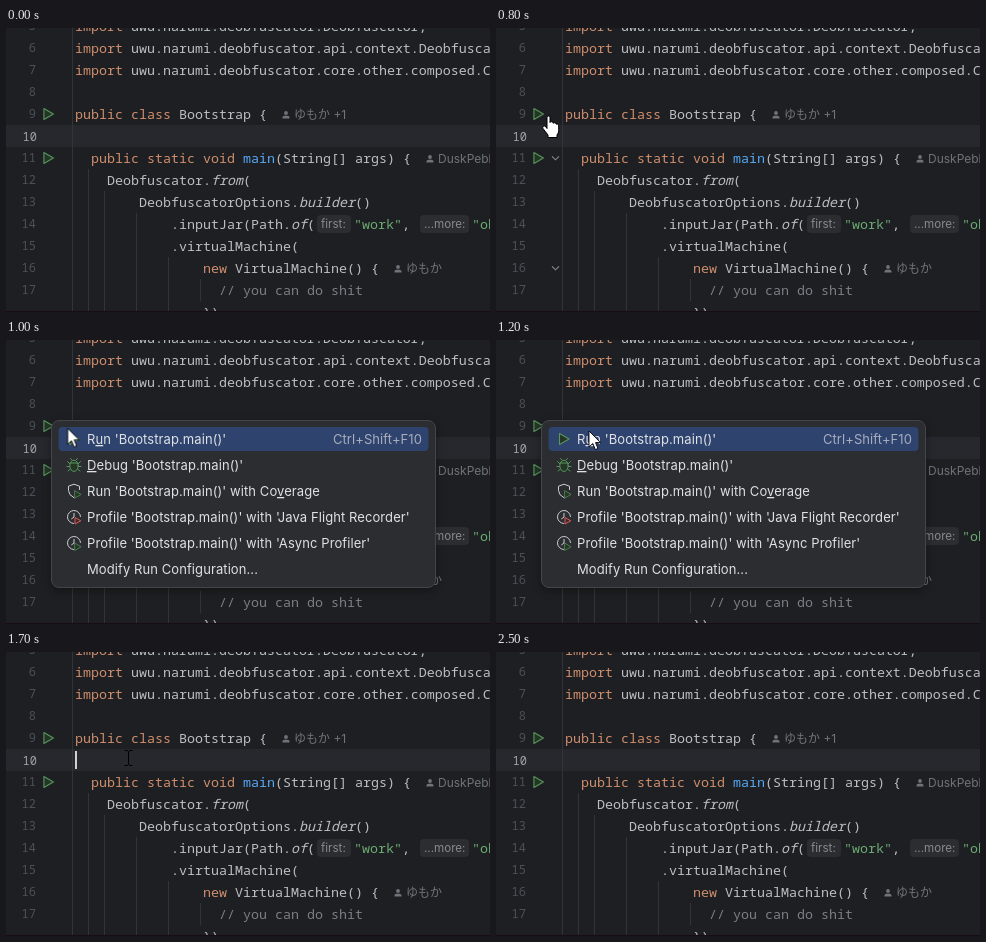
An HTML page for the animation above (2600 ms loop, 484 by 284 pixels).

```html
<!DOCTYPE html>
<html lang="en">
<head>
<meta charset="utf-8">
<title>Run menu in a code editor</title>
<style>
html, body { margin: 0; width: 100%; height: 100%; overflow: hidden; background: #1e1f22; }
svg { display: block; width: 484px; height: 284px; }
text { white-space: pre; }
.code { font: 13.333px "Noto Sans Mono", "DejaVu Sans Mono", monospace; fill: #bcbec4; }
.num { font: 12px "Noto Sans Mono", "DejaVu Sans Mono", monospace; fill: #4b5059; text-anchor: end; }
.num .now { fill: #a1a3ab; }
.kw { fill: #cf8e6d; }
.fn { fill: #56a8f5; }
.str { fill: #6aab73; }
.rem { fill: #7a7e85; }
.it { font-style: italic; }
.hint { font: 12px Inter, "Noto Sans CJK JP", "Noto Sans CJK", sans-serif; fill: #6f737a; }
.tag { font-size: 11.6px; fill: #868a91; }
.ui { font: 13px Inter, "Open Sans", sans-serif; letter-spacing: .085px; fill: #dfe1e5; }
.m { text-decoration: underline; }
.guide { stroke: #313438; fill: none; }
.line { fill: none; stroke: #ced0d6; stroke-linecap: round; stroke-linejoin: round; }

.track, .beam, .hand, .arrow, .caret, .folds, .menu, .pick, .keys {
  animation: 2600ms step-end infinite;
}
.track { animation-name: track; }
.beam { animation-name: beam; }
.hand, .folds { animation-name: hand; }
.arrow, .menu { animation-name: menu; }
.caret { animation-name: caret; }
.pick { animation-name: pick; }
.keys { animation-name: keys; text-anchor: end; }
.menu { filter: drop-shadow(0 3px 4px #0005); }

/* the pointer advances ten times a second */
@keyframes track {
  0% { transform: translate(320px, 210px); }
  3.84% { transform: translate(320px, 210px); animation-timing-function: steps(5); }
  23.07% { transform: translate(78px, 106px); }
  26.92% { transform: translate(56px, 92px); }
  30.76% { transform: translate(53px, 88px); }
  34.61% { transform: translate(46px, 87px); animation-timing-function: steps(3); }
  46.15% { transform: translate(93px, 91px); animation-timing-function: steps(4); }
  61.53% { transform: translate(112px, 97px); }
  65.38% { transform: translate(122px, 106px); animation-timing-function: steps(6); }
  88.46%, 100% { transform: translate(318px, 235px); }
}
@keyframes beam {
  0% { opacity: 0 } 3.84% { opacity: 1 } 26.92% { opacity: 0 }
  65.38% { opacity: 1 } 96.15%, 100% { opacity: 0 }
}
@keyframes hand { 0% { opacity: 0 } 26.92% { opacity: 1 } 34.61%, 100% { opacity: 0 } }
@keyframes menu { 0% { opacity: 0 } 34.61% { opacity: 1 } 65.38%, 100% { opacity: 0 } }
@keyframes pick { 0% { opacity: 0 } 38.46% { opacity: 1 } 65.38%, 100% { opacity: 0 } }
@keyframes keys { 0% { fill: #6f737a } 38.46% { fill: #a8adbd } 65.38%, 100% { fill: #6f737a } }
@keyframes caret {
  0% { opacity: 0 } 3.84% { opacity: 1 } 23.07% { opacity: 0 }
  65.38% { opacity: 1 } 84.61%, 100% { opacity: 0 }
}
</style>
</head>
<body>
<svg viewBox="0 0 484 284">
  <defs>
    <path id="play" d="M-4.5-5.5L5 0L-4.5 5.5Z" fill="#253627" stroke="#57965c" stroke-linejoin="round" stroke-width="1.1"/>
    <g id="user" fill="#6f737a">
      <circle cy="-2" r="1.9"/>
      <path d="M-3.5 3.5V2.6Q-3.5.8-1.6.8H1.6Q3.5.8 3.5 2.6V3.5Z"/>
    </g>
    <path id="fold" d="M-3.5-1.7L0 1.8L3.5-1.7" fill="none" stroke="#868a91" stroke-width="1.1"/>
    <path id="clock" class="line" d="M6.5-.5A6.5 6.5 0 1 0-.5 6.5M0-3.6V0L-2.4 1.8"/>
  </defs>

  <rect width="484" height="284" fill="#1e1f22"/>
  <rect y="97" width="484" height="22" fill="#26282e"/>
  <path class="guide" d="M66.5 0V284M82.5 141V284M98.5 163V284M130.5 185V284M162.5 229V284M194.5 251V273"/>

  <g class="num">
    <text x="30" y="2">5</text>
    <text x="30" y="24">6</text>
    <text x="30" y="46">7</text>
    <text x="30" y="68">8</text>
    <text x="30" y="90">9</text>
    <text x="31" y="112.5" class="now">10</text>
    <text x="30" y="134">11</text>
    <text x="30" y="156">12</text>
    <text x="30" y="178">13</text>
    <text x="30" y="200">14</text>
    <text x="30" y="222">15</text>
    <text x="30" y="244">16</text>
    <text x="30" y="266">17</text>
  </g>

  <g class="code">
    <text x="69" y="3"><tspan class="kw">import</tspan> uwu.narumi.deobfuscator.Deobfuscator;</text>
    <text x="69" y="25"><tspan class="kw">import</tspan> uwu.narumi.deobfuscator.api.context.Deobfuscator</text>
    <text x="69" y="47"><tspan class="kw">import</tspan> uwu.narumi.deobfuscator.core.other.composed.C</text>
    <text x="69" y="91"><tspan class="kw">public class</tspan> Bootstrap {</text>
    <text x="85" y="135"><tspan class="kw">public static void</tspan> <tspan class="fn">main</tspan>(String[] args) {</text>
    <text x="101" y="157">Deobfuscator.<tspan class="it">from</tspan>(</text>
    <text x="133" y="179">DeobfuscatorOptions.<tspan class="it">builder</tspan>()</text>
    <text x="165" y="201">.inputJar(Path.<tspan class="it">of</tspan>(</text>
    <text x="348" y="201"><tspan class="str">"work"</tspan>,</text>
    <text x="466" y="201" class="str">"obf</text>
    <text x="165" y="223">.virtualMachine(</text>
    <text x="197" y="245"><tspan class="kw">new</tspan> VirtualMachine() {</text>
    <text x="213" y="267" class="rem">// you can do shit</text>
    <text x="197" y="289">})</text>
  </g>

  <g fill="#2b2d30">
    <rect x="311" y="187" width="34" height="18" rx="4"/>
    <rect x="414" y="187" width="49" height="18" rx="4"/>
  </g>
  <g class="hint">
    <text class="tag" x="315" y="200">first:</text>
    <text class="tag" x="418" y="200">...more:</text>
    <use href="#user" x="280" y="87"/>
    <text x="288" y="91">ゆもか +1</text>
    <use href="#user" x="424" y="131"/>
    <text x="432" y="135">DuskPebbler</text>
    <use href="#user" x="392" y="241"/>
    <text x="400" y="245">ゆもか</text>
  </g>

  <use href="#play" x="42.4" y="86"/>
  <use href="#play" x="42.4" y="130"/>
  <g class="folds">
    <use href="#fold" x="59.5" y="130"/>
    <use href="#fold" x="59.5" y="240"/>
  </g>
  <rect class="caret" x="69" y="99" width="2" height="18" fill="#ced0d6"/>
  <rect y="283" width="484" height="1" fill="#170d12"/>

  <g class="menu">
    <rect x="45.5" y="80.5" width="384" height="167" rx="7.5" fill="#2b2d30" stroke="#43454a"/>
    <rect class="pick" x="52.5" y="87" width="370" height="24" rx="4" fill="#2e436e"/>

    <use href="#play" x="68" y="99"/>
    <g transform="translate(68 125)" fill="#253627" stroke="#57965c" stroke-linecap="round">
      <path fill="none" d="M-4-1L-6.5-3.5M-4 1.5H-7M-3.5 4L-6 6M4-1L6.5-3.5M4 1.5H7M3.5 4L6 6M-2-5L-3.5-6.5M2-5L3.5-6.5"/>
      <ellipse cy=".8" rx="4.2" ry="5.6"/>
      <path d="M-3.6-2H3.6"/>
    </g>
    <g transform="translate(68 151)">
      <path class="line" d="M0 6.8Q-5.5 4-5.5-.5V-4.8L0-6.8L5.5-4.8V-1.5"/>
      <use href="#play" transform="translate(3.7 3.4) scale(.68)"/>
    </g>
    <g transform="translate(68 177)">
      <use href="#clock"/>
      <path d="M1 .6L6.8 3.8L1 7Z" fill="#402929" stroke="#db5c5c" stroke-linejoin="round"/>
    </g>
    <g transform="translate(68 203)">
      <use href="#clock"/>
      <use href="#play" transform="translate(3.7 3.8) scale(.68)"/>
    </g>

    <g class="ui">
      <text x="81" y="104">R<tspan class="m">u</tspan>n 'Bootstrap.main()'</text>
      <text class="keys" x="416" y="104">Ctrl+Shift+F10</text>
      <text x="81" y="130"><tspan class="m">D</tspan>ebug 'Bootstrap.main()'</text>
      <text x="81" y="156">Run 'Bootstrap.main()' with Co<tspan class="m">v</tspan>erage</text>
      <text x="81" y="182">Profile 'Bootstrap.main()' with 'Java Flight Recorder'</text>
      <text x="81" y="208">Profile 'Bootstrap.main()' with 'Async Profiler'</text>
      <text x="81" y="234">Modify Run Configuration...</text>
    </g>
  </g>

  <g class="track">
    <path class="beam" d="M-3.5-7.5H-1L.5-6.5L2-7.5H4.5M.5-6.5V6.5M-3.5 7.5H-1L.5 6.5L2 7.5H4.5" fill="none" stroke="#000"/>
    <path class="hand" fill="#fff" stroke="#000" stroke-linejoin="round"
      d="M-2 1.5Q-2 0-.5 0T1 1.5V6.5Q1.5 5.5 2.8 5.7T4.2 7.2Q5 6.4 6 6.8T7.2 8.2Q8.2 7.6 9 8.2T9.7 10V14.5Q9.7 17 8 19V21.5H-1V19L-6 12.5Q-6.8 11-5.5 10.2T-3 11L-2 12.5Z"/>
    <path class="arrow" fill="#fff" stroke="#000" stroke-width=".9"
      d="M0 0V16L3.8 12.5L6.4 18.6L9 17.5L6.5 11.6H11.5Z"/>
  </g>
</svg>
</body>
</html>
```
